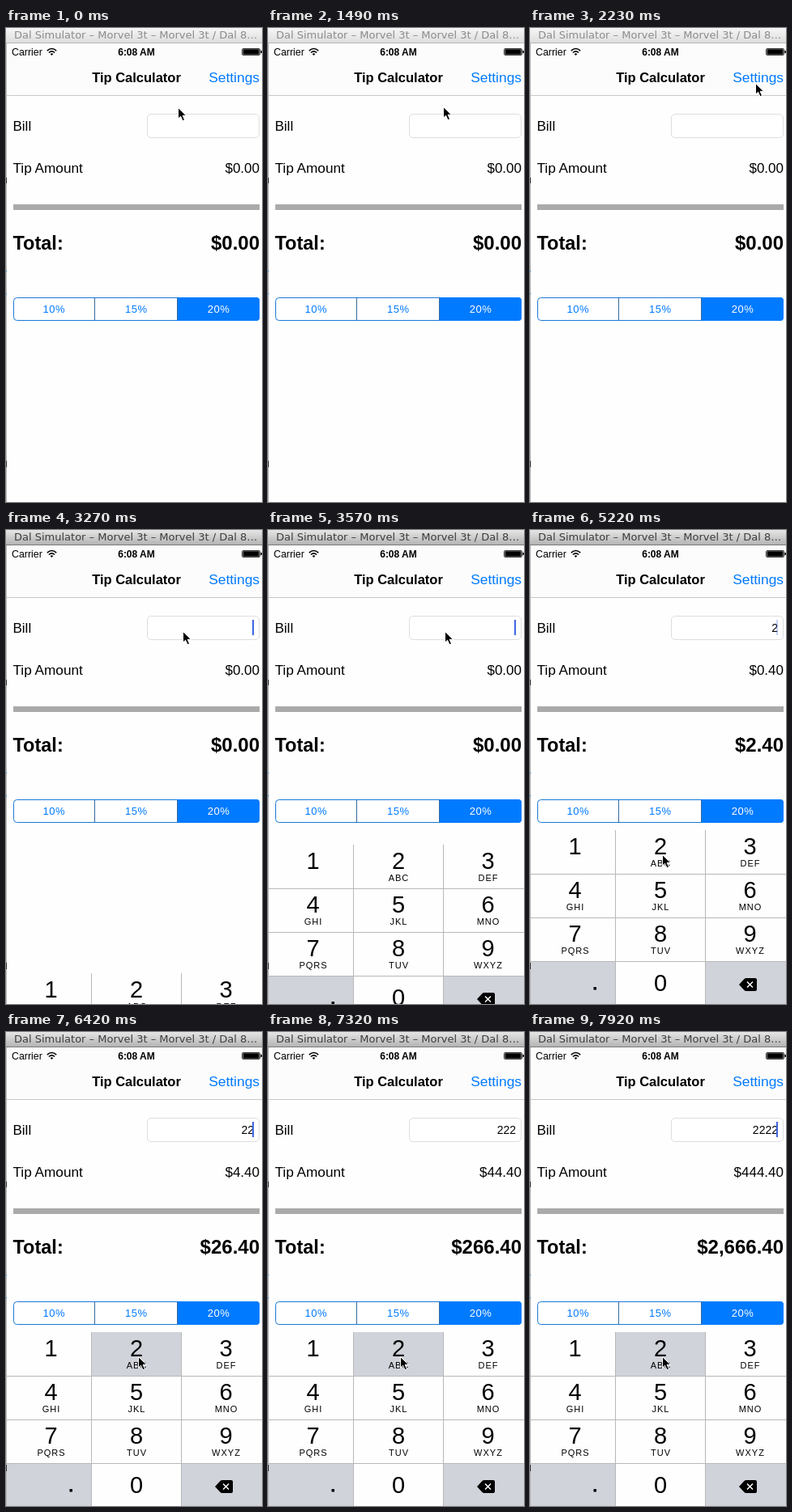
These frames come from a looping animation (316 by 586 pixels, 8 s). An HTML page:

```html
<!DOCTYPE html>
<html lang="en">
<head>
<meta charset="utf-8">
<title>Tip Calculator</title>
<style>
  html, body { margin: 0; width: 100%; height: 100%; overflow: hidden; background: #fff; }
  svg { display: block; width: 316px; height: 586px; }
  text { font-family: "Liberation Sans", Arial, sans-serif; font-size: 17px; }
  .bold { font-weight: bold; }
  .end { text-anchor: end; }
  .mid { text-anchor: middle; }
  .window-title { font: 13px "DejaVu Sans", sans-serif; fill: #8b8b8b; }
  .active .window-title { fill: #3d3d3d; }
  .bar { fill: url(#idle); }
  .active .bar { fill: url(#front); }
  .bar-edge { fill: #b5b5b5; }
  .active .bar-edge { fill: #7b7b7b; }
  .status { font-size: 12.4px; }
  .blue { fill: #007aff; }
  .total { font-size: 24px; font-weight: bold; }
  .segment { font-size: 13px; letter-spacing: .5px; }
  .digit { font-size: 29px; }
  .letters { font-size: 11px; letter-spacing: 1px; }
</style>
</head>
<body>
<svg id="stage" viewBox="0 0 316 586">
  <defs>
    <linearGradient id="idle" x2="0" y2="1">
      <stop stop-color="#f6f6f6"/><stop offset="1" stop-color="#dedede"/>
    </linearGradient>
    <linearGradient id="front" x2="0" y2="1">
      <stop stop-color="#e6e6e6"/><stop offset="1" stop-color="#b4b4b4"/>
    </linearGradient>
  </defs>
  <rect width="316" height="586" fill="#fefefe"/>

  <!-- Navigation and status bars -->
  <rect y="19" width="316" height="64" fill="#fcfcfc"/>
  <rect y="83" width="316" height="1" fill="#c8c8c8"/>
  <text class="status" x="7" y="34">Carrier</text>
  <g fill="none" stroke="#000" stroke-width="1.6">
    <path d="M50.8 28.2Q56.5 22.8 62.2 28.2M52.9 30.5Q56.5 27.1 60.1 30.5"/>
  </g>
  <path d="M54.6 32Q56.5 30.3 58.4 32L56.5 34Z"/>
  <text class="bold mid" x="161" y="34" style="font-size:12px">6:08 AM</text>
  <rect x="291.5" y="25.5" width="22" height="8" rx="1.5" fill="#fff" stroke="#000" stroke-width=".8"/>
  <rect x="292.5" y="26.2" width="20" height="6.6" rx=".6"/>
  <rect x="314.5" y="28" width="1.5" height="3"/>
  <text class="bold mid" x="161" y="67" style="font-size:16.5px">Tip Calculator</text>
  <text class="blue end" x="313" y="67" style="font-size:17.4px">Settings</text>

  <!-- Form -->
  <text x="8.5" y="127">Bill</text>
  <rect x="174.5" y="106.5" width="138" height="29" rx="4.5" fill="#fff" stroke="#dedede"/>
  <text id="bill" class="end" x="306" y="126" style="font-size:14px"></text>
  <rect id="caret" x="304" y="111" width="2" height="19" fill="#4066e0"/>
  <text x="8.5" y="179" style="font-size:17.2px">Tip Amount</text>
  <text id="tip" class="end" x="313" y="179"></text>
  <rect x="9" y="218" width="304" height="7" fill="#aaa"/>
  <text class="total" x="8.5" y="274" style="font-size:23.5px">Total:</text>
  <text id="total" class="total end" x="313" y="274"></text>

  <!-- Tip choices -->
  <rect x="9.5" y="333.5" width="303" height="28" rx="4" fill="#fff" stroke="#1a78d6"/>
  <path class="blue" d="M211 333H309Q313 333 313 337V358Q313 362 309 362H211Z"/>
  <path d="M109.5 334V361M211.5 334V361" stroke="#35699e"/>
  <text class="segment blue mid" x="59.3" y="352">10%</text>
  <text class="segment blue mid" x="160.8" y="352">15%</text>
  <text class="segment mid" x="262.5" y="352" fill="#fff">20%</text>

  <g id="keyboard"></g>

  <!-- Window frame -->
  <rect width="1" height="586" fill="#b9b9b9"/>
  <path d="M.5 185V192M.5 535V543" stroke="#333"/>
  <path d="M0 300.5H1M0 328.5H1" stroke="#007aff"/>
  <g id="window">
    <rect class="bar" width="316" height="18"/>
    <rect class="bar-edge" y="18" width="316" height="1"/>
    <text class="window-title" x="10" y="13">Dal Simulator – Morvel 3t – Morvel 3t / Dal 8…</text>
  </g>

  <path id="pointer" d="M.5 .5V14L3.6 11.2L6 16.7L8.5 15.6L6.1 10.3H10.4Z" stroke="#fff" stroke-width="1"/>
</svg>
<script>
const $ = id => document.getElementById(id);
const LOOP = 8000;

// Each track lists [tick, ...values]
const pointerTrack = [[0, 212, 98], [1, 211, 99], [9, 211, 99], [15, 278, 68], [17, 278, 68],
  [22, 218, 125], [24, 218, 125], [29, 149, 401], [31, 148, 400], [33, 163, 401]];
const keyboardTrack = [[21, 215], [22, 177], [23, 72], [24, 18], [25, 0]];
const caretTrack = [[0, 0], [22, 1], [25, .5], [26, 0], [28, .25], [29, .65], [30, 1], [35, .3],
  [36, 0], [37, 1], [40, .5], [41, 0], [43, 1], [48, .4], [49, 0], [50, 1]];
const typedAt = [35, 37, 44, 50];
const pressedAt = [36, 43, 49, 53];
const ACTIVATED = 17;

const held = (track, tick) => track.filter(key => key[0] <= tick).pop() || track[0];

function eased(track, tick) {
  const from = held(track, tick);
  const to = track[track.indexOf(from) + 1];
  if (!to || tick < from[0]) return from.slice(1);
  const p = (tick - from[0]) / (to[0] - from[0]);
  const e = p * p * (3 - 2 * p);
  return from.slice(1).map((v, i) => v + (to[i + 1] - v) * e);
}

function buildKeyboard() {
  const centers = [55.5, 161, 271.5];
  const letters = ["", "ABC", "DEF", "GHI", "JKL", "MNO", "PQRS", "TUV", "WXYZ"];
  let out = `<rect y="371" width="316" height="215" fill="#fefefe"/>
    <rect id="key" x="106" y="371" width="110" height="54" fill="#d0d3da"/>
    <path d="M0 533H105V586H0ZM217 533H316V586H217Z" fill="#d0d3da"/>
    <path d="M105.5 371V586M216.5 371V586M0 425.5H316M0 479.5H316M0 533.5H316" stroke="#b8b8b8"/>`;
  letters.forEach((label, i) => {
    const x = centers[i % 3], y = 371 + 54 * Math.floor(i / 3);
    out += `<text class="digit mid" x="${x}" y="${y + 30}">${i + 1}</text>
      <text class="letters mid" x="${x + .5}" y="${y + 45}">${label}</text>`;
  });
  out += `<text class="digit mid" x="161" y="570">0</text>
    <rect x="78.5" y="565" width="3.5" height="3.5"/>
    <path d="M258 562L264.5 555Q265.5 554 267 554H278Q280 554 280 556V568Q280 570 278 570H267Q265.5 570 264.5 569Z"/>
    <path d="M268 558.5L275 565.5M275 558.5L268 565.5" stroke="#fff" stroke-width="1.5"/>`;
  $("keyboard").innerHTML = out;
}

const money = n => "$" + n.toLocaleString("en-US", { minimumFractionDigits: 2, maximumFractionDigits: 2 });

// The screen refreshes about every 150 ms, with three slightly shorter steps
function tickAt(t) {
  const lead = [1490, 2230, 3270].filter(mark => t >= mark).length * 10;
  return Math.floor((t + lead) / 150);
}

function draw(tick) {
  const [x, y] = eased(pointerTrack, tick).map(Math.round);
  $("pointer").setAttribute("transform", `translate(${x} ${y})`);
  $("keyboard").setAttribute("transform", `translate(0 ${held(keyboardTrack, tick)[1]})`);
  $("caret").setAttribute("opacity", held(caretTrack, tick)[1]);
  $("key").setAttribute("opacity", pressedAt.includes(tick) ? 1 : 0);
  $("window").setAttribute("class", tick >= ACTIVATED ? "active" : "");

  const bill = "2".repeat(typedAt.filter(at => at <= tick).length);
  $("bill").textContent = bill;
  $("tip").textContent = money(bill * .2);
  $("total").textContent = money(bill * 1.2);
}

buildKeyboard();
const start = performance.now();
let shown = -1;
function frame() {
  const tick = tickAt((performance.now() - start) % LOOP);
  if (tick !== shown) draw(shown = tick);
  requestAnimationFrame(frame);
}
frame();
</script>
</body>
</html>
```
